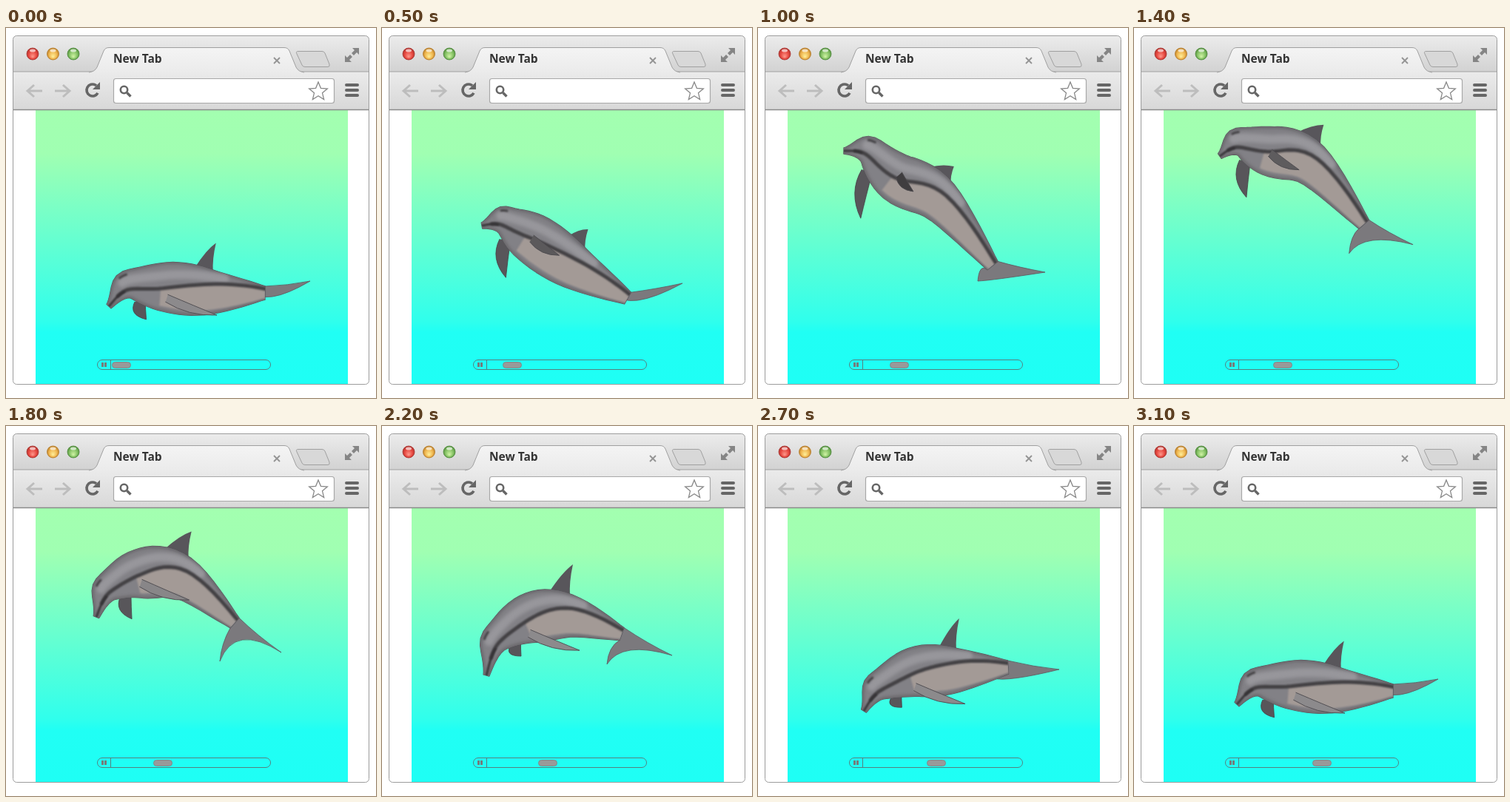
An HTML page with a canvas for the animation above (3.2 s loop, 500x500 px).

```html
<!DOCTYPE html>
<html>
<head>
<meta charset="utf-8">
<style>
html, body { margin: 0; width: 100%; height: 100%; overflow: hidden; background: #fff; }
canvas { display: block; width: 500px; height: 500px; }
</style>
</head>
<body>
<canvas id="stage" width="500" height="500"></canvas>
<script>
const ctx = document.getElementById('stage').getContext('2d');
const LOOP = 3200, STEP = 100, CYCLE = 3100;

// Spine joints: beak, head, chest, middle, tail stock, fluke tip.
const POSES = [
  { at: 0, spine: [[139, 376], [165, 350], [215, 350], [280, 357], [350, 358], [411, 342]] },
  { at: 500, spine: [[135, 267], [163, 263], [200, 282], [262, 325], [332, 365], [406, 345]] },
  { at: 1000, spine: [[116, 166], [148, 168], [188, 202], [245, 233], [317, 321], [388, 330]] },
  { at: 1800, spine: [[122, 258], [138, 222], [180, 200], [237, 205], [309, 266], [372, 306]] },
  { at: 2200, spine: [[141, 337], [155, 291], [197, 261], [252, 257], [324, 281], [392, 310]] },
  { at: 2700, spine: [[143, 385], [163, 355], [210, 333], [271, 330], [338, 326], [407, 329]] }
];

const mix = (a, b, u) => a + (b - a) * u;
const mixPoint = (p, q, u) => [mix(p[0], q[0], u), mix(p[1], q[1], u)];
const shift = (p, x, y) => [p[0] + x, p[1] + y];

// Cubic through b and c, with neighbours a and d at uneven times.
function hermite([a, b, c, d], [ta, tb, tc, td], u) {
  const vb = (c - a) / (tc - ta) * (tc - tb);
  const vc = (d - b) / (td - tb) * (tc - tb);
  const v = 1 - u;
  return b * (1 + 2 * u) * v * v + vb * u * v * v + c * u * u * (3 - 2 * u) - vc * u * u * v;
}

function poseAt(i) {
  const n = POSES.length, { at, spine } = POSES[(i + n) % n];
  return { at: at + CYCLE * Math.floor(i / n), spine };
}

function spineAt(t) {
  const seg = POSES.findLastIndex(p => p.at <= t);
  const near = [-1, 0, 1, 2].map(k => poseAt(seg + k));
  const times = near.map(p => p.at);
  const u = (t - times[1]) / (times[2] - times[1]);
  const lift = seg === 2 ? 24 * Math.sin(Math.PI * u) : 0; // top of the leap
  return POSES[0].spine.map((_, j) => [0, 1].map(axis =>
    hermite(near.map(p => p.spine[j][axis]), times, u) - axis * lift));
}

function pointOn(spine, s) {
  const i = Math.min(3, Math.floor(s));
  const near = [-1, 0, 1, 2].map(k => spine[Math.max(0, Math.min(4, i + k))]);
  return [0, 1].map(axis => hermite(near.map(p => p[axis]), [-1, 0, 1, 2], s - i));
}

// Half thickness at s (0 beak to 4 tail stock); the forehead bulges on top.
function girth(s, side) {
  const x = s / 4;
  const melon = side < 0 ? 6 * Math.exp(-(((x - 0.22) / 0.08) ** 2)) : 0;
  return 4 + 5 * x + 28 * Math.max(0, Math.sin(Math.PI * x ** 1.27)) ** 1.3 + melon;
}

// Point at s along the body; v runs from -1 (back) to 1 (belly).
function onBody(spine, s, v) {
  const p = pointOn(spine, s);
  const a = pointOn(spine, Math.max(0, s - 0.05)), b = pointOn(spine, Math.min(4, s + 0.05));
  const dx = b[0] - a[0], dy = b[1] - a[1];
  const w = v * girth(s, v) / Math.hypot(dx, dy);
  return [p[0] - dy * w, p[1] + dx * w];
}

function alongBody(spine, s0, s1, vAt) {
  return Array.from({ length: 33 }, (_, i) => {
    const s = mix(s0, s1, i / 32);
    return onBody(spine, s, vAt(s));
  });
}

function polyline(pts) {
  const path = new Path2D();
  pts.forEach(p => path.lineTo(...p));
  return path;
}

function curvedShape(start, ...bends) {
  const path = new Path2D();
  path.moveTo(...start);
  bends.forEach(([control, end]) => path.quadraticCurveTo(...control, ...end));
  return path;
}

function finShape(root, tip, front, rear) {
  const dx = tip[0] - root[0], dy = tip[1] - root[1], len = Math.hypot(dx, dy);
  const at = (u, w) => shift(mixPoint(root, tip, u), -dy / len * w, dx / len * w);
  return curvedShape(at(0, front * 0.5),
    [at(0.5, front * 1.5), tip], [at(0.55, -rear * 0.4), at(0, -rear)]);
}

function fill(path, color) { ctx.fillStyle = color; ctx.fill(path); }
function stroke(path, color, width = 1) {
  ctx.strokeStyle = color;
  ctx.lineWidth = width;
  ctx.stroke(path);
}
function vertical(y0, y1, ...stops) {
  const g = ctx.createLinearGradient(0, y0, 0, y1);
  stops.forEach(([at, color]) => g.addColorStop(at, color));
  return g;
}
function rounded(x, y, w, h, r) {
  const p = new Path2D();
  p.roundRect(x, y, w, h, r);
  return p;
}

function drawDolphin(t) {
  const spine = spineAt(t);
  const [beak, , chest, , stock, fluke] = spine;
  const pitch = (stock[1] - beak[1]) / 200, climb = Math.max(0, pitch);
  const on = (s, v) => onBody(spine, s, v);
  const along = (s0, s1, vAt) => alongBody(spine, s0, s1, vAt);
  ctx.save();
  ctx.lineCap = ctx.lineJoin = 'round';

  const farRoot = on(1.35, 0.85), reach = 30 + 45 * pitch;
  const farFin = finShape(farRoot, shift(farRoot, reach * (0.3 - 0.55 * pitch), reach), 14, 8);
  fill(farFin, '#58565a');
  stroke(farFin, '#434144', 0.8);

  const swing = fluke[1] - stock[1];
  const otherTip = shift(stock, -20, swing + 12), under = on(4, 1);
  const tail = curvedShape(on(4, -1),
    [shift(mixPoint(stock, fluke, 0.5), 0, -2), fluke],
    [shift(stock, 0, Math.min(20, 32 - 0.8 * swing)), otherTip],
    [shift(otherTip, 2, -24), under]);
  fill(tail, '#7b797d');
  stroke(tail, '#5b595d', 0.8);

  const front = on(2.58, -0.9), rear = on(2.97, -0.9);
  const crest = shift(rear, 4, 18 * pitch - 38);
  fill(curvedShape(front,
    [shift(mixPoint(front, crest, 0.6), -2, -4), crest],
    [shift(mixPoint(rear, crest, 0.45), -3, 0), rear]), '#58565b');

  const back = along(0, 4, () => -1), belly = along(4, 0, () => 1);
  const body = polyline([...back, ...belly]);
  body.closePath();
  stroke(body, '#565459', 1.4);
  fill(body, '#828186');

  // The dark band leaves the eye below the middle and climbs to the tail.
  const band = s => 0.3 * Math.sin(s * 1.2) - 0.08 * s;
  ctx.save();
  ctx.clip(body);
  ctx.filter = 'blur(2px)';
  stroke(polyline(back), '#5b595e', 3);
  stroke(polyline(along(0.9, 3.2, s => mix(-1, band(s), 0.5))), '#97969b', 12);
  stroke(polyline(belly), '#656265', 4);
  ctx.filter = 'blur(1px)';
  const pale = [...along(1.9, 4, band), ...along(4, 1.9, () => 0.8)];
  fill(polyline(pale), '#a39a96');
  stroke(polyline(along(0.55, 4, band)), '#434144', 5);
  stroke(polyline(along(0, 0.8, s => 0.3 * s)), '#343235', 3);
  stroke(polyline(along(0.9, 1.05, () => -0.75)), '#434144', 3);
  ctx.restore();

  const nearRoot = shift(chest, 2, 14 - 22 * pitch);
  const tone = Math.round(140 - 100 * climb);
  const nearFin = finShape(nearRoot, shift(nearRoot, 68 - 62 * climb, 22), 9, 6);
  fill(nearFin, `rgb(${tone},${tone - 2},${tone})`);
  stroke(nearFin, '#4b494d', 0.9);
  ctx.restore();
}

function drawArrow(x, dir) {
  const p = new Path2D();
  p.moveTo(x, 85); p.lineTo(x - dir * 20, 85);
  p.moveTo(x - dir * 9, 77); p.lineTo(x, 85); p.lineTo(x - dir * 9, 93);
  stroke(p, '#bdbdbd', 3);
}

function drawLight(x, edge, mid, glow) {
  const g = ctx.createRadialGradient(x, 39, 0, x, 35, 8.5);
  g.addColorStop(0, glow);
  g.addColorStop(0.65, mid);
  g.addColorStop(1, edge);
  const disc = new Path2D();
  disc.arc(x, 35, 8, 0, 7);
  fill(disc, g);
  stroke(disc, edge, 0.8);
  const shine = new Path2D();
  shine.ellipse(x, 30.5, 4, 2, 0, 0, 7);
  fill(shine, 'rgba(255,255,255,.65)');
}

function drawIcons() {
  drawArrow(29, -1);
  drawArrow(86, 1);

  const reload = new Path2D();
  reload.arc(117, 84, 8, 0.5, 5.4);
  stroke(reload, '#666', 3.6);
  fill(new Path2D('M127 73v10h-10z'), '#666');

  const lens = new Path2D();
  lens.arc(159.5, 83.5, 4.7, 0, 7);
  stroke(lens, '#666', 2.6);
  stroke(new Path2D('M163.5 87.5l5 5'), '#666', 3.4);

  const star = new Path2D();
  for (let i = 0; i < 10; i++) {
    const r = i % 2 ? 5.8 : 13, a = i * Math.PI / 5 - Math.PI / 2;
    star.lineTo(422 + r * Math.cos(a), 86 + r * Math.sin(a));
  }
  star.closePath();
  fill(star, '#fff');
  stroke(star, '#888', 1.3);

  for (const y of [75, 82, 89]) fill(rounded(458, y, 19, 4, 2), '#666');

  stroke(new Path2D('M362 40l8 8m0-8l-8 8'), '#939393', 1.8);
  fill(new Path2D('M468 27h9v9l-3-3-4 4-3-3 4-4zM458 37l3 3 4-4 3 3-4 4 3 3h-9z'), '#858585');
}

function drawBrowser() {
  ctx.fillStyle = '#fff';
  ctx.fillRect(0, 0, 500, 500);
  const frame = rounded(9.5, 10.5, 481, 471, 5);
  ctx.save();
  ctx.clip(frame);
  ctx.fillStyle = vertical(10, 59, [0, '#ececec'], [1, '#d2d2d2']);
  ctx.fillRect(9, 10, 482, 49);
  ctx.fillStyle = vertical(59, 110, [0, '#ebebeb'], [1, '#d8d8d8']);
  ctx.fillRect(9, 59, 482, 51);
  ctx.restore();

  stroke(new Path2D('M10 59H490'), '#a0a0a0');
  const tab = new Path2D('M112 60Q120 59 123 53L132 31Q134 26.5 139 26.5H376Q381 26.5 383 31L392 53Q395 59 403 60');
  fill(tab, vertical(26, 60, [0, '#f4f4f4'], [1, '#ebebeb']));
  stroke(tab, '#a0a0a0');
  const newTab = new Path2D('M395 31.5H427Q430 31.5 431 34L437 49Q438 52.5 435 52.5H404Q401 52.5 400 50L393 35Q391 31.5 395 31.5Z');
  fill(newTab, '#d8d8d8');
  stroke(newTab, '#a0a0a0');

  const box = rounded(145.5, 68.5, 298, 33, 3);
  fill(box, '#fff');
  stroke(box, '#a8a8a8', 1.2);

  drawLight(36, '#a93430', '#e5453d', '#ff9a8d');
  drawLight(63.5, '#b47a28', '#eeb34c', '#fff09a');
  drawLight(91, '#4f8a3b', '#82bf62', '#d2f5a6');
  drawIcons();

  ctx.fillStyle = '#333';
  ctx.font = '600 15.5px "Noto Sans", "Open Sans", sans-serif';
  ctx.fillText('New Tab', 145, 47);

  ctx.fillStyle = vertical(111, 481, [0, '#a3ffb0'], [0.16, '#a0ffb2'],
    [0.35, '#7cffc5'], [0.77, '#30ffec'], [0.81, '#20fff4'], [1, '#1efff5']);
  ctx.fillRect(40, 111, 422, 370);
  stroke(new Path2D('M10 110.5H490'), '#8a8a8a', 1.4);
  stroke(frame, '#9c9c9c');
}

function drawPlayer(progress) {
  const wobble = 6 * (1 - progress) * Math.sin(2 * Math.PI * progress);
  const x = Math.round(143 + 98 * progress + wobble);
  stroke(rounded(123.5, 448.5, 234, 13, 6.5), '#55807f');
  stroke(new Path2D('M141.5 449V461'), '#55807f');
  ctx.fillStyle = '#757b7b';
  ctx.fillRect(129, 452, 3, 6);
  ctx.fillRect(133, 452, 3, 6);
  const thumb = rounded(x + 0.5, 451.5, 25, 8, 4);
  fill(thumb, '#999');
  stroke(thumb, '#7b8c8c');
}

function render(time) {
  const t = Math.floor(time % LOOP / STEP) * STEP;
  drawBrowser();
  drawDolphin(t);
  drawPlayer(t / CYCLE);
}

const start = performance.now();
function tick() {
  render(performance.now() - start);
  requestAnimationFrame(tick);
}
tick();
</script>
</body>
</html>
```
